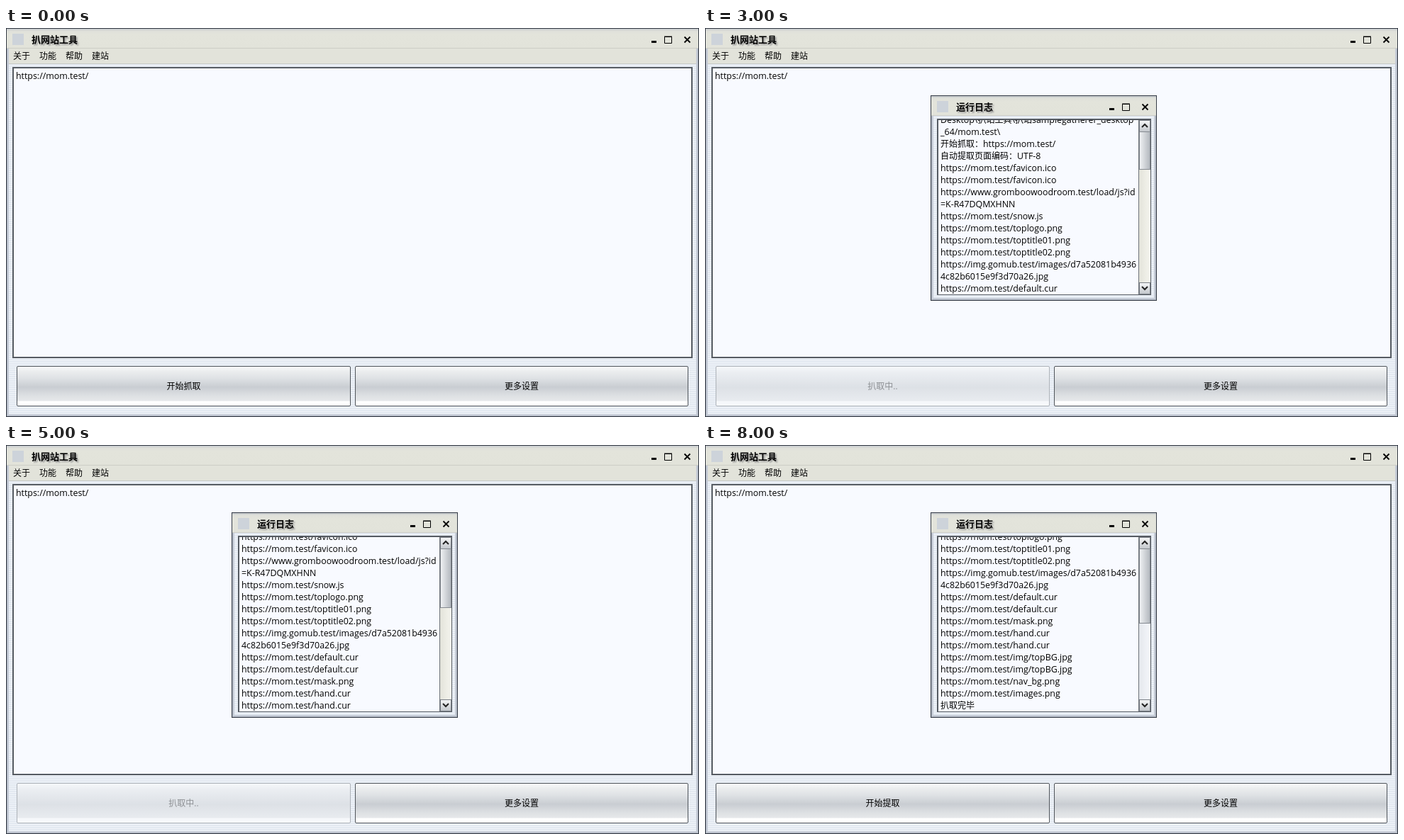
An HTML page that plays this animation: 977x549 px, repeating every 9 s.

```html
<!DOCTYPE html>
<html lang="zh-CN">
<head>
<meta charset="utf-8">
<style>
html, body { margin: 0; width: 100%; height: 100%; overflow: hidden; background: #fff; }
body { position: relative; font: 12px/17px "Open Sans", "Noto Sans CJK SC", "Noto Sans CJK", sans-serif; color: #000; }
div, svg, h1, pre { position: absolute; box-sizing: border-box; margin: 0; white-space: pre; }
[hidden] { display: none; }

.win {
  border: 1px solid #363c46; overflow: hidden;
  background: repeating-linear-gradient(#f0f4f9 0 1px, #e3e9f1 1px 3px);
  box-shadow: inset 0 0 0 1px #a9b0bc, inset 0 0 0 3px #c6ccd7;
}
.main { left: 0; top: 0; width: 977px; height: 549px; }
.log { width: 319px; height: 290px; }
.bar { left: 0; right: 0; top: 0; height: 28px; background: linear-gradient(#bfc4c9, #dfe0da 3px, #e3e4db 8px, #e2e3da); border-bottom: 1px solid #cccdc6; }
.icon { left: 8px; top: 7px; width: 16px; height: 16px; background: #cdd3da; }
h1 { left: 35px; top: 6px; font: bold 13px/18px "Noto Sans CJK SC", "Noto Sans CJK", sans-serif; text-shadow: 2px 2px 2px #999; }
.tools { right: 5px; top: 9px; width: 61px; height: 14px; }
.menu { left: 3px; right: 3px; top: 28px; height: 22px; background: #e2e3da; border-bottom: 1px solid #c8cac6; }
.menu div { top: 2px; }
.area { left: 8px; top: 54px; width: 959px; height: 411px; border: 2px solid #565b62; background: #f8faff; }
.latin { font-size: 12.4px; }
.latin b { font-size: 12px; font-weight: 400; }
.btn {
  top: 476px; width: 471px; height: 57px; border: 1px solid #50555b; border-radius: 2px;
  text-align: center; line-height: 56px;
  background: linear-gradient(#fbfbfc 0, #eceeef 6px, #dfe2e5 16px, #c9cdd2 29px, #dcdfe2 40px, #e6e8ea 48px, #fff 49px);
}
.off { border-color: #aeb3b9; color: #8d9094; background: linear-gradient(#f6f8fa 0, #ebeef2 8px, #dde1e6 29px, #e8ebef 48px, #f6f8fb 49px); }

.view { left: 8px; top: 32px; width: 302px; height: 249px; border: solid #565b62; border-width: 2px 1px 1px 2px; background: #f8faff; overflow: hidden; }
.lines { left: 3px; line-height: 17px; font-family: inherit; }
.scroll { right: 0; top: 0; width: 17px; height: 246px; border-left: 1px solid #6d7279; background: linear-gradient(90deg, #e3e3da, #f5f5ee); }
.scroll.done { background: linear-gradient(90deg, #e4e7ec, #f5f7fb); }
.arrow { left: 0; width: 16px; height: 17px; border: 1px solid #7b8087; background: linear-gradient(#f4f5f6, #c4c8cd); }
.arrow svg { left: 0; top: 0; }
.thumb { left: 0; top: 16px; width: 16px; border: 1px solid #858a91; background: linear-gradient(90deg, #eef0f2, #b4b9bf); }

.files { left: 0; top: 0; width: 977px; height: 549px; background: #fff; }
.files svg { left: 0; top: 0; }
.name { width: 90px; top: 19px; text-align: center; font-size: 12.2px; }
.hint { left: 790px; top: 254px; color: #6d6d6d; }
</style>
</head>
<body>
<script>
const SITE = 'https://mom.test/';
const LINES = [
  '初始化创建存放文件夹： C:\\Users\\Administrator\\',
  'Desktop\\扒站工具\\扒站samplegatherer_desktop',
  '_64/mom.test\\',
  '开始抓取：' + SITE,
  '自动提取页面编码：UTF-8',
  SITE + 'favicon.ico', SITE + 'favicon.ico',
  'https://www.gromboowoodroom.test/load/js?id',
  '=K-R47DQMXHNN',
  ...['snow.js', 'toplogo.png', 'toptitle01.png', 'toptitle02.png'].map(f => SITE + f),
  'https://img.gomub.test/images/d7a52081b4936',
  '4c82b6015e9f3d70a26.jpg',
  ...['default.cur', 'default.cur', 'mask.png', 'hand.cur', 'hand.cur',
    'img/topBG.jpg', 'img/topBG.jpg', 'nav_bg.png', 'images.png'].map(f => SITE + f),
  '扒取完毕'
];
// Per second: visible line count and scroll thumb height
const COUNT = [0, 5, 15, 16, 18, 20, 24, 24, 25];
const THUMB = [0, 0, 46, 54, 69, 84, 102, 102, 106];

// Chinese runs are set slightly smaller than Latin ones
const mix = s => s.replace(/[\u2e80-\uffff]+/g, '<b>$&</b>');

const win = (cls, title, body) => `<div class="win ${cls}">
  <div class="bar"><div class="icon"></div><h1>${title}</h1>
  <svg class="tools" viewBox="0 0 61 14" fill="none" stroke="#000">
    <path d="M0 9.5h7" stroke-width="3"/><path d="M18.5 2.5h10v9h-10z"/><path d="M18 2h11"/>
    <path d="M46.5 2.5l8 8m0-8l-8 8" stroke-width="1.8"/>
  </svg></div>${body}</div>`;

const arrow = (top, path) => `<div class="arrow" style="top:${top}px"><svg width="14" height="15"
  fill="none" stroke="#222" stroke-width="2"><path d="${path}"/></svg></div>`;

const name = (x, text) => `<div class="name" style="left:${x - 45}px">${text}</div>`;

const cursorIcon = x => `<g transform="translate(${x})">
  <rect x=".5" y="-20" width="40" height="37.5" rx="1" fill="url(#blue)" stroke="#86abc9"/>
  <g fill="none" stroke="#f4faff" stroke-width="4"><circle cx="16" cy="6" r="4"/><circle cx="31" cy="2" r="3"/></g>
  <path d="M5 17c0-7 7-8 9 0z" fill="#f4faff"/></g>`;

const menu = ['关于', '功能', '帮助', '建站']
  .map((s, i) => `<div style="left:${6 + 37 * i}px">${s}</div>`).join('');

document.body.innerHTML = win('main', '扒网站工具', `
  <div class="menu">${menu}</div>
  <div class="area"><div class="latin" style="left:3px;top:2px">${SITE}</div></div>
  <div class="btn" id="start" style="left:14px"></div>
  <div class="btn" style="left:491px;width:470px">更多设置</div>`) +
win('log', '运行日志', `<div class="view">
  <pre class="lines latin" id="lines"></pre>
  <div class="scroll" id="scroll">${arrow(0, 'M3 9l4-4 4 4')}${arrow(229, 'M3 5l4 4 4-4')}
  <div class="thumb" id="thumb"></div></div></div>`) +
`<div class="files" id="files">
  <svg width="977" height="549">
    <defs><linearGradient id="blue" x2="1" y2="1"><stop stop-color="#d3eafa"/><stop offset="1" stop-color="#8fc1e8"/></linearGradient></defs>
    <path d="M35 0h20v14l-20 3z" fill="#f3f4f5"/><path d="M46.5 0v17" stroke="#d9dbde"/>
    <path d="M23 0h9l3 4v13l-12-4z" fill="#fbe09a"/>
    ${cursorIcon(98)}${cursorIcon(175)}
    <rect x="252.5" y="-20" width="35" height="37.5" rx="1" fill="#fff" stroke="#c4c4c4"/>
    <circle cx="270" cy="0" r="10.5" fill="#4cc43c"/>
    <path d="M705.5 0v546" stroke="#f2f2f2"/><path d="M0 548h977" stroke="#fafafa" stroke-width="2"/>
  </svg>
  ${name(39, 'js')}${name(117, 'default.cur')}${name(193, 'hand.cur')}
  ${name(270, 'index_http\nsmomtest\n.html')}
  <div class="hint">选择要预览的文件。</div>
</div>`;

const $ = id => document.getElementById(id);
const log = document.querySelector('.log');
let shown = -1;

function show(sec) {
  const n = COUNT[sec], busy = sec > 0 && sec < 8;
  $('files').hidden = sec !== 7;
  log.hidden = sec === 0;
  log.style.left = (sec === 1 ? 208 : 318) + 'px';
  log.style.top = (sec === 1 ? 140 : 95) + 'px';
  $('lines').innerHTML = LINES.slice(0, n).map(mix).join('\n');
  $('lines').style.top = Math.min(0, 246 - 17 * n) + 'px';
  $('scroll').hidden = sec < 2;
  $('scroll').classList.toggle('done', sec === 8);
  $('thumb').style.height = THUMB[sec] + 'px';
  $('start').textContent = busy ? '扒取中..' : sec ? '开始提取' : '开始抓取';
  $('start').classList.toggle('off', busy);
}

const begin = performance.now();
function tick() {
  const sec = Math.floor((performance.now() - begin) % 9000 / 1000);
  if (sec !== shown) show(shown = sec);
  requestAnimationFrame(tick);
}
tick();
</script>
</body>
</html>
```
